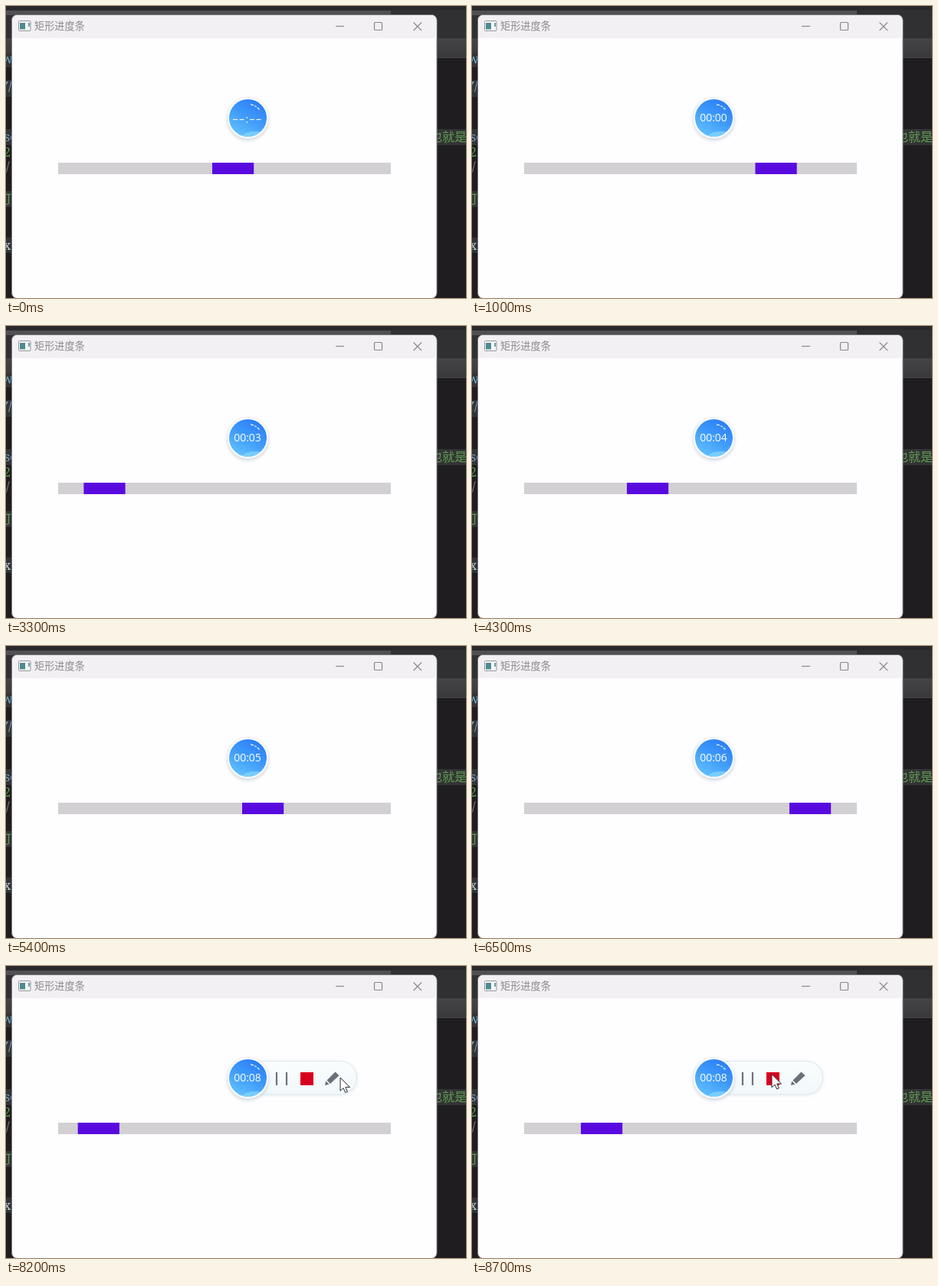
Animation of 600x382 px, one loop 8.8 s. Source, as an HTML page:

```html
<!DOCTYPE html>
<html lang="zh">
<head>
<meta charset="utf-8">
<title>进度条</title>
<style>
  html, body { margin: 0; width: 100%; height: 100%; overflow: hidden; background: #1f1d1f; }
  svg { display: block; width: 100vw; height: 100vh; }
  text { font-family: "Noto Sans CJK SC", "Noto Sans CJK", "Noto Sans", sans-serif; }
  .code text { font-family: "Noto Serif", "Noto Sans CJK SC", "Noto Sans CJK", serif; font-size: 16px; }
  #clock { font-family: "Open Sans", "Noto Sans", sans-serif; font-size: 14px; fill: #fff; }
</style>
</head>
<body>
<svg viewBox="0 0 600 382">
  <defs>
    <linearGradient id="blue" x1=".8" y1="0" x2=".25" y2="1">
      <stop offset="0" stop-color="#287bf5"/>
      <stop offset=".5" stop-color="#409bf9"/>
      <stop offset="1" stop-color="#62c2fb"/>
    </linearGradient>
    <linearGradient id="pale" x1="0" y1="0" x2="0" y2="1">
      <stop offset="0" stop-color="#fafdfe"/>
      <stop offset="1" stop-color="#f1f8fb"/>
    </linearGradient>
    <linearGradient id="toolbar" x1="0" y1="0" x2="0" y2="1">
      <stop offset="0" stop-color="#444346"/>
      <stop offset="1" stop-color="#39383b"/>
    </linearGradient>
    <filter id="soft" x="-30%" y="-30%" width="160%" height="160%">
      <feGaussianBlur stdDeviation="2"/>
    </filter>
    <clipPath id="trackClip"><rect x="68" y="205" width="434" height="15"/></clipPath>
    <clipPath id="ballClip"><circle cx="315.5" cy="146.5" r="24.5"/></clipPath>
    <clipPath id="panelClip"><rect id="panelMask" x="290" y="118" width="0" height="58"/></clipPath>
  </defs>

  <!-- editor behind the window -->
  <g class="code">
    <rect width="600" height="382" fill="#1f1d1f"/>
    <rect width="600" height="43" fill="#302f32"/>
    <rect width="600" height="5" fill="#29282b"/>
    <rect y="6" width="502" height="6" fill="#504f52"/>
    <rect y="43" width="600" height="24" fill="url(#toolbar)"/>
    <path d="M0 43H600M0 67.5H600" stroke="#4a494c" stroke-width="1"/>
    <g fill="#343336">
      <rect y="62" width="8" height="18"/>
      <rect y="97" width="8" height="22"/>
      <rect y="161" width="600" height="21"/>
      <rect y="242" width="8" height="21"/>
      <rect y="303" width="8" height="20"/>
    </g>
    <text x="-5" y="75" fill="#6db3d8">w</text>
    <text x="-7" y="111" fill="#7eaed0">Y/</text>
    <text x="-2" y="177" fill="#74a9cf">se</text>
    <text x="-3" y="197" fill="#5da04f">2</text>
    <text x="0" y="216" fill="#8a8a8a">/</text>
    <text x="-9" y="258" fill="#5da04f">可</text>
    <text x="-3" y="319" fill="#b9d3e4">x</text>
    <text x="553" y="177" fill="#5da04f">也就是</text>
  </g>

  <!-- window -->
  <rect x="7.5" y="11.5" width="554.5" height="371" rx="7" fill="#fefdff" stroke="#777578"/>
  <path d="M8 42V19a7 7 0 0 1 7-7H554.500a7 7 0 0 1 7 7V42Z" fill="#f2f0f3"/>
  <rect x="16.500" y="19.500" width="15.500" height="13" rx="1" fill="#f7f8f8" stroke="#919598"/>
  <rect x="18" y="22" width="7" height="8.500" fill="#4f8b91"/>
  <path d="M30 22V27" stroke="#57798b" stroke-width="1.500"/>
  <text x="37" y="31" font-size="13.200" fill="#8b898c">矩形进度条</text>
  <g fill="none" stroke="#8b898c" stroke-width="1.200">
    <path d="M430 26.500H441"/>
    <rect x="480.500" y="21.500" width="10" height="10" rx="1"/>
    <path d="M531.500 21.500L542 32M542 21.500L531.500 32"/>
  </g>

  <!-- progress bar -->
  <rect x="68" y="205" width="434" height="15" fill="#d2d0d2"/>
  <g clip-path="url(#trackClip)">
    <rect id="block" y="205" width="54.200" height="15" fill="#590bdf"/>
  </g>

  <!-- recorder -->
  <g id="panel" clip-path="url(#panelClip)">
    <rect x="296" y="125" width="162" height="44" rx="22" fill="#b9c9d2" opacity=".35" filter="url(#soft)"/>
    <rect x="296" y="124.500" width="161.500" height="43.500" rx="21.700" fill="url(#pale)" stroke="#dfe8ed"/>
    <path d="M353 139V156M366 139V156" stroke="#6d737b" stroke-width="2.200"/>
    <rect x="384" y="139" width="17" height="17" fill="#d9001f"/>
    <g fill="#69707a">
      <path d="M416 156L417.200 150.500L421.500 154.800Z"/>
      <path d="M418.500 149.500L429.500 138.500L434.500 143.300L423 154Z"/>
    </g>
  </g>
  <circle cx="315.500" cy="148.500" r="27" fill="#7b99ad" opacity=".4" filter="url(#soft)"/>
  <circle cx="315.500" cy="146.500" r="27" fill="#fcfeff" stroke="#e3eaf0" stroke-width=".7"/>
  <circle cx="315.500" cy="146.500" r="24.500" fill="url(#blue)"/>
  <ellipse cx="326" cy="173" rx="20" ry="9" fill="#8bdcff" opacity=".65" clip-path="url(#ballClip)"/>
  <path d="M319 128.800Q326 130 330.500 135.500" fill="none" stroke="#e8f6ff" stroke-width="1.300" stroke-dasharray="4 1.500 3 1.500"/>
  <text id="clock" x="315" y="151" text-anchor="middle"></text>

  <path id="cursor" d="M0 0V17.300L4 13.700L6.700 19.500L9.400 18.300L6.800 12.600H12.500Z"
    fill="#fff" stroke="#2b2b2b" stroke-width="1" stroke-linejoin="round"/>
</svg>
<script>
  const $ = id => document.getElementById(id);
  const LOOP = 8800, STEP = 100, SPAN = 488;

  // [ms, distance] with the lap length added at each wrap
  const travel = [[0, 269], [1000, 369.5], [2300, 494], [3600, 618], [4300, 690], [4500, 706],
    [5400, 796], [6500, 902], [7600, 1009], [8100, 1060], [8700, 1118]];
  // [ms, x, y]
  const pointer = [[7200, 428, 73], [7400, 392, 126], [7600, 368, 151], [7800, 335, 151],
    [8000, 372, 150], [8200, 436, 146], [8400, 398, 143], [8600, 391, 141.5]];

  function at(keys, t, col = 1) {
    const i = keys.findIndex(k => k[0] > t);
    if (i < 0) return keys[keys.length - 1][col];
    if (i === 0) return keys[0][col];
    const a = keys[i - 1], b = keys[i];
    return a[col] + (b[col] - a[col]) * (t - a[0]) / (b[0] - a[0]);
  }

  function setClock(t) {
    const blank = t < 200;
    const clock = $("clock");
    clock.textContent = blank ? "––:––" : "00:0" + Math.floor((t - 200) / 1000);
    clock.setAttribute("y", blank ? 152.5 : 151);
    clock.setAttribute("letter-spacing", blank ? 1.5 : 0);
  }

  function draw(t) {
    const x = (at(travel, t) - 14) % SPAN + 14;
    $("block").setAttribute("x", x);
    setClock(t);

    const open = Math.min(1, Math.max(0, (t - 7800) / 200));
    $("panelMask").setAttribute("width", 175 * open);
    $("panel").style.display = open ? "" : "none";

    const cursor = $("cursor");
    cursor.style.display = t >= pointer[0][0] ? "" : "none";
    cursor.setAttribute("transform", `translate(${at(pointer, t)} ${at(pointer, t, 2)})`);
  }

  const start = performance.now();
  function tick() {
    const t = (performance.now() - start) % LOOP;
    draw(Math.floor(t / STEP) * STEP);
    requestAnimationFrame(tick);
  }
  draw(0);
  requestAnimationFrame(tick);
</script>
</body>
</html>
```
